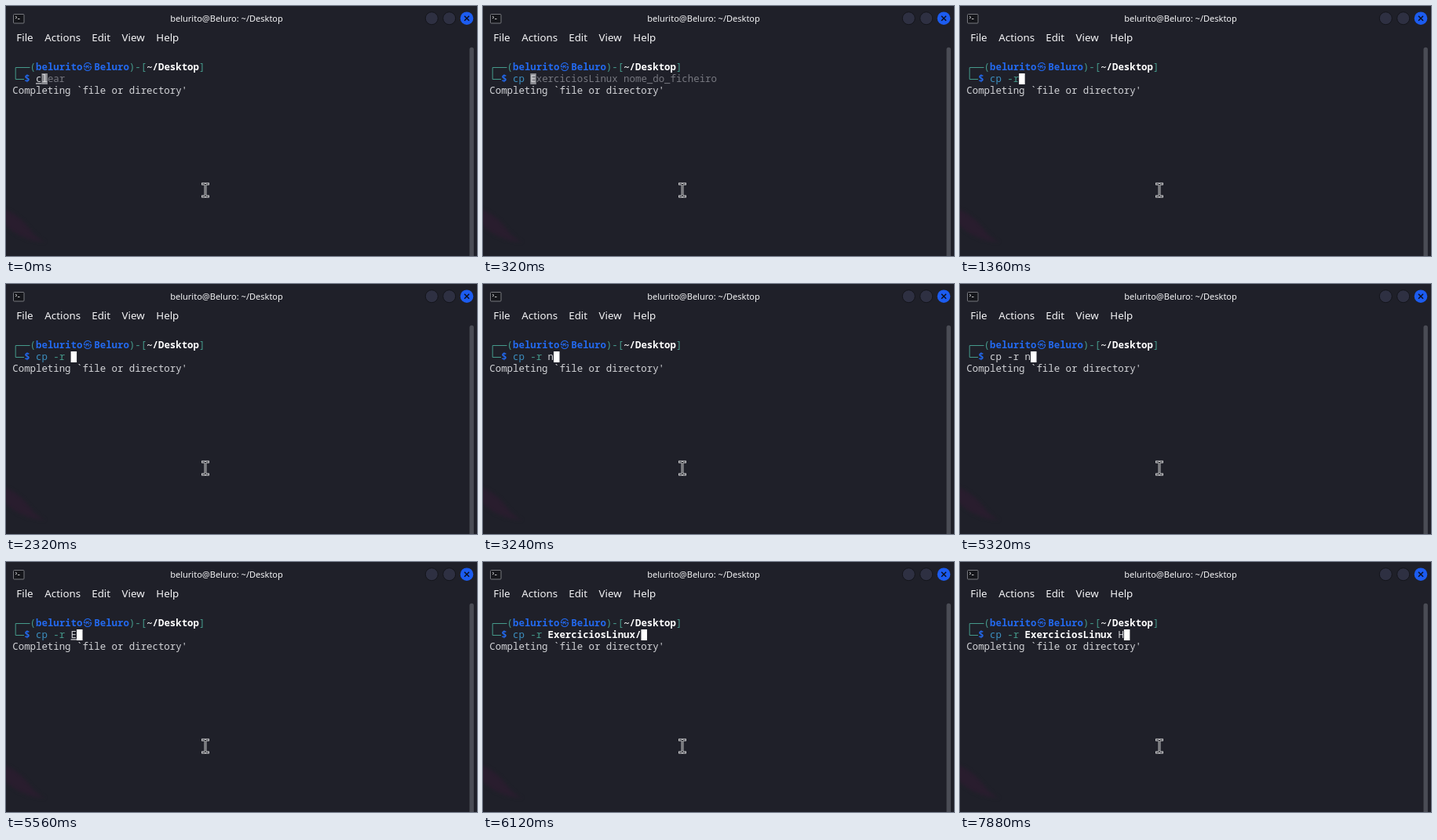
Animation of 600x319 px, one loop 8000 ms. Source, as an HTML page:

```html
<!DOCTYPE html>
<html lang="en">
<head>
<meta charset="utf-8">
<title>Terminal</title>
<style>
html, body { margin: 0; width: 100%; height: 100%; overflow: hidden; background: #1f2029; }
svg { display: block; width: 600px; height: 319px; }
text { white-space: pre; fill: #d4d5d9; }
.ui { font: 500 13.3px "Noto Sans", "Open Sans", sans-serif; fill: #f4f4f6; }
.title { font-size: 11.03px; text-anchor: middle; }
.mono { font: 12.38px "Noto Sans Mono", "DejaVu Sans Mono", monospace; }
.frame { fill: #459a8b; }
.blue { fill: #2369ee; font-weight: bold; }
.sign { font-family: "Noto Sans CJK KR", "Noto Sans CJK SC", "Noto Sans CJK JP", sans-serif; font-size: 11px; }
.path { fill: #fff; font-weight: bold; }
.cmd { fill: #3c8fc0; }
.opt { fill: #459a8b; }
.part { text-decoration: underline; }
.hint { fill: #777880; }
.over { fill: #d4d5d9; }
</style>
</head>
<body>
<svg viewBox="0 0 600 319">
  <rect width="600" height="319" fill="#1f2029"/>
  <path d="M-5 258Q16 266 28 282T50 301Q18 300 -5 276z" fill="#291d2e" style="filter: blur(2px)"/>

  <rect x="9.5" y="10.5" width="13.5" height="11.5" rx="1" fill="#15161b" stroke="#77787e"/>
  <path d="M12 13l2 1.5l-2 1.5M15 16.5h2.5" fill="none" stroke="#d8d8da" stroke-width=".9"/>
  <text class="ui title" x="281" y="20">belurito@Beluro: ~/Desktop</text>
  <g fill="#2e3042" stroke="#14151b">
    <circle cx="542.3" cy="15.7" r="8"/>
    <circle cx="564.7" cy="15.7" r="8"/>
  </g>
  <circle cx="587" cy="15.7" r="8.3" fill="#1c5cf0"/>
  <path d="M584 12.7l6 6m0-6l-6 6" stroke="#0d1020" stroke-width="1.5"/>

  <text class="ui" y="45"><tspan x="13.3">File</tspan><tspan x="49.3">Actions</tspan><tspan x="109.3">Edit</tspan><tspan x="147.5">View</tspan><tspan x="191.3">Help</tspan></text>
  <path d="M590.5 319V55.5a2.7 2.7 0 0 1 5.4 0V319z" fill="#4a4c55"/>

  <path d="M30.5 78.5H12.2V93.5H23" fill="none" stroke="#459a8b"/>
  <text class="mono frame" x="30.6" y="82.3">(<tspan class="blue">belurito</tspan><tspan class="blue sign" x="98.5">㉿</tspan><tspan class="blue" x="112.3">Beluro</tspan>)-[<tspan class="path">~/Desktop</tspan>]</text>
  <text class="mono blue" x="23.2" y="97.3">$</text>
  <rect id="cursor" y="86" width="7.5" height="14"/>
  <text class="mono" id="line" x="38" y="97.3"></text>
  <text class="mono" x="8.3" y="112.2">Completing `file or directory'</text>

  <g fill="none">
    <path id="beam" d="M250.5 227h2.5l1 1l1-1h2.5M254 228v14M250.5 243h2.5l1-1l1 1h2.5" stroke-linecap="square"/>
    <use href="#beam" stroke="#e2e2e4" stroke-width="2.8"/>
    <use href="#beam" stroke="#15161c"/>
  </g>
</svg>
<script>
const LOOP = 8000, CELL = 7.43, LEFT = 38;
const files = 'ExerciciosLinux nome_do_ficheiro';

// Each step: start time, typed text, suggested rest, colours dropped
const steps = [
  [0, 'c', 'lear'],
  [120, 'cp', ' ' + files],
  [280, 'cp ', files],
  [720, 'cp -', ''],
  [1040, 'cp -r', ''],
  [1440, 'cp -r ', ''],
  [3200, 'cp -r n', ''],
  [3400, 'cp -r n', '', true],
  [3480, 'cp -r n', ''],
  [5320, 'cp -r n', '', true],
  [5400, 'cp -r ', ''],
  [5520, 'cp -r E', ''],
  [5800, 'cp -r Ex', ''],
  [6040, 'cp -r ExerciciosLinux/', ''],
  [7320, 'cp -r ExerciciosLinux ', ''],
  [7880, 'cp -r ExerciciosLinux H', '']
];

const styles = [
  [/^cp$/, 'cmd'],
  [/^-/, 'opt'],
  [/^Exer/, 'path'],
  [/^(c|Ex?)$/, 'part']
];

const line = document.getElementById('line');
const cursor = document.getElementById('cursor');
const span = (text, name) => `<tspan class="${name}">${text}</tspan>`;
const styled = word => span(word, (styles.find(([rule]) => rule.test(word)) || [])[1] || '');

let shown;
function draw(now) {
  const time = now % LOOP;
  const step = steps.findLast(([start]) => start <= time);
  if (step !== shown) {
    const [, typed, hint, plain] = shown = step;
    line.innerHTML = (plain ? typed : typed.replace(/\S+/g, styled)) +
      span(hint.slice(0, 1), 'over') + span(hint.slice(1), 'hint');
    cursor.setAttribute('x', LEFT + typed.length * CELL);
    cursor.setAttribute('fill', hint ? '#8b8c92' : '#fff');
  }
  requestAnimationFrame(draw);
}
draw(performance.now());
</script>
</body>
</html>
```
